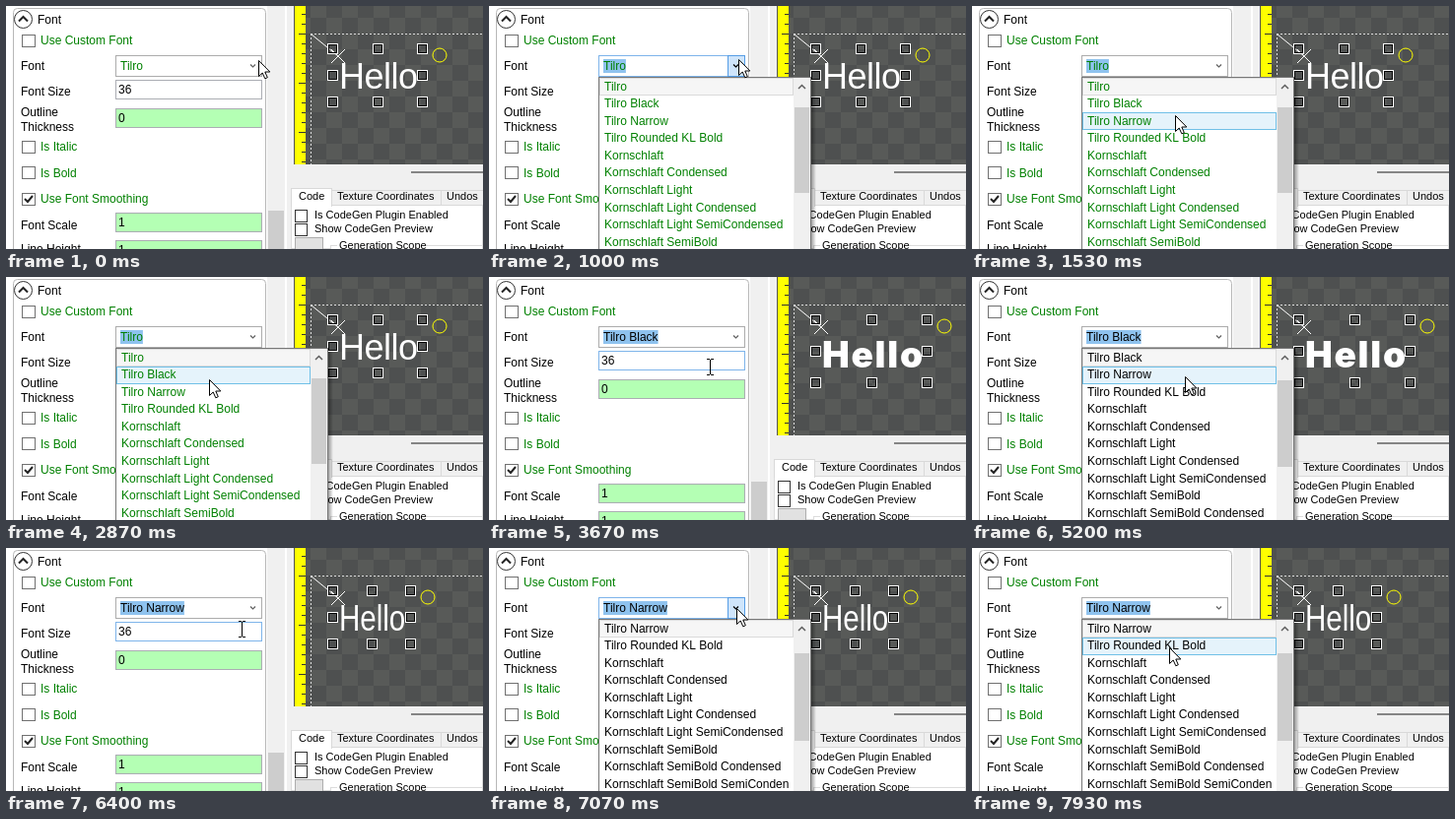
Write an HTML page with a canvas that moves like this. It is 484 px wide and 247 px high and loops after 8 s.

```html
<!DOCTYPE html>
<html lang="en">
<head>
<meta charset="utf-8">
<title>Font picker</title>
<style>
html, body { margin: 0; width: 100%; height: 100%; overflow: hidden; background: #f0f0f0; }
canvas { display: block; }
</style>
</head>
<body>
<canvas id="stage" width="484" height="247"></canvas>
<script>
const g = document.getElementById('stage').getContext('2d');
const SANS = '"Liberation Sans", sans-serif';
const GREEN = '#008000', BLUE = '#7eb4ea', GREY = '#acacac';
const LOOP = 8000, TICKS_PER_MS = 0.015;
const ROW = 17.58, FIELD_X = 111, FIELD_W = 149, LABEL_X = 15;

const family = (name, styles) => styles.map(s => (name + ' ' + s).trim());
const fonts = [
  ...family('Tilro', ['', 'Black', 'Narrow', 'Rounded KL Bold']),
  ...family('Kornschlaft', ['', 'Condensed', 'Light', 'Light Condensed', 'Light SemiCondensed',
    'SemiBold', 'SemiBold Condensed', 'SemiBold SemiConden'])
];
const laterFonts = ['Gavemor Old Style', 'Toolcrate Symbol 7', 'Dorvley Hand IZD', 'Lorvantic Bold',
  'Cobblane', 'Plume Script MF', 'Caladea', 'Solviri', 'Solviri Light', 'Vestolinian TP', 'Corvano MF'];

// Pointer keys: tick, x, y
const pointerKeys = [[0, 257, 55], [2, 254, 54], [18, 254, 54], [23, 207, 111], [24, 206, 112],
  [26, 206, 112], [32, 207, 104], [49, 207, 104], [51, 218, 100], [53, 218, 100], [63, 253, 59],
  [71, 253, 59], [78, 217, 101], [90, 217, 101], [96, 240, 83], [99, 251, 64], [101, 252, 61],
  [114, 252, 61], [119, 201, 101], [120, 201, 101]];
// Drop-down sessions: open tick, close tick
const sessions = [[14, 45], [67, 89], [105, 121]];
const busySpans = [[39, 43], [83, 87]];
// Sample text per chosen font; right and bottom are handle centres
const samples = [
  { font: '36px ' + SANS, right: 422, bottom: 97, baseline: 84, squeeze: 1, spacing: '-0.5px' },
  { font: '900 37px Inter, sans-serif', right: 444, bottom: 107, baseline: 92, squeeze: 1, spacing: '1.7px' },
  { font: '36px ' + SANS, right: 410, bottom: 97, baseline: 84, squeeze: 0.82, spacing: '0px' }
];

const within = (tick, [from, to]) => tick >= from && tick < to;

function rect(x, y, w, h, fill, border) {
  if (border) {
    g.fillStyle = border;
    g.fillRect(x, y, w, h);
    x++; y++; w -= 2; h -= 2;
  }
  g.fillStyle = fill;
  g.fillRect(x, y, w, h);
}

function frameBox(x, y, size, color) {
  g.strokeStyle = color;
  g.lineWidth = 1;
  g.strokeRect(x - size / 2 + 0.5, y - size / 2 + 0.5, size, size);
}

function text(s, x, baseline, color = '#000', size = 12) {
  g.font = size + 'px ' + SANS;
  g.fillStyle = color;
  g.fillText(s, x, baseline);
}

function line(points, color, width = 1, dash = []) {
  g.beginPath();
  points.forEach(([x, y]) => g.lineTo(x, y));
  g.setLineDash(dash);
  g.strokeStyle = color;
  g.lineWidth = width;
  g.stroke();
  g.setLineDash([]);
}

function circle(x, y, r, color, width = 1) {
  g.beginPath();
  g.arc(x, y, r, 0, Math.PI * 2);
  g.strokeStyle = color;
  g.lineWidth = width;
  g.stroke();
}

const chevron = (x, y, w, h, color, width) =>
  line([[x - w, y], [x, y + h], [x + w, y]], color, width);

function checkbox(y, label, baseline, checked) {
  rect(16, y, 14, 13, '#fff', '#707070');
  if (checked) line([[19, y + 6], [22, y + 9], [27, y + 3]], '#212121', 2);
  text(label, 35, baseline, GREEN);
}

function field(y, value, fill, border = '#abadb3') {
  rect(FIELD_X, y, FIELD_W, 20, fill, border);
  text(value, 114, y + 14);
}

function drawForm(tick, sel, pointer, open) {
  rect(0, 0, 285, 247, '#fff');
  g.beginPath();
  g.roundRect(7.5, 2.5, 256, 260, 4);
  g.strokeStyle = '#b8b8b8';
  g.lineWidth = 1;
  g.stroke();
  rect(265, 0, 18, 247, '#f0f0f0');
  rect(266, 208, 16, 39, '#cdcdcd');

  circle(17.5, 13.5, 9, '#333');
  chevron(17.5, 15.5, 4.5, -4.5, '#222', 2);
  text('Font', 32, 18);
  checkbox(29, 'Use Custom Font', 39);
  text('Font', LABEL_X, 65);
  text('Font Size', LABEL_X, 91);
  text('Outline', LABEL_X, 112);
  text('Thickness', LABEL_X, 127);
  checkbox(137, 'Is Italic', 147);
  checkbox(163, 'Is Bold', 174);
  checkbox(190, 'Use Font Smoothing', 200, true);
  text('Font Scale', LABEL_X, 227);
  text('Line Height', LABEL_X, 251);

  const overSize = !open && pointer.y > 75 && pointer.y < 95;
  field(75, '36', '#fff', overSize ? BLUE : undefined);
  field(104, '0', '#b4ffb4');
  field(210, '1', '#b4ffb4');
  field(238, '1', '#b4ffb4');

  const overCombo = tick > 0 && pointer.y < 73;
  rect(FIELD_X, 50, FIELD_W, 22, '#fff', overCombo ? BLUE : GREY);
  if (overCombo) rect(242, 50, 18, 22, open ? '#cfe5fb' : '#dcecfc', open ? '#569de5' : BLUE);
  if (tick >= sessions[0][0]) {
    g.font = '12px ' + SANS;
    rect(116, 54, g.measureText(fonts[sel]).width, 14, '#8fc3ef');
  }
  text(fonts[sel], 116, 65, sel ? '#000' : GREEN);
  chevron(250.5, 59.5, 2.5, 2.5, overCombo ? '#000' : '#606060', 1.2);
}

function drawHandles(xs, ys) {
  xs.forEach((x, i) => ys.forEach((y, j) => {
    if (i !== 1 || j !== 1) {
      frameBox(x, y, 10, '#fff');
      frameBox(x, y, 8, '#000');
    }
  }));
}

function drawEditor(sel) {
  rect(285, 0, 199, 247, '#f0f0f0');
  g.save();
  g.beginPath();
  g.rect(304, 0, 180, 161);
  g.clip();
  for (let x = 0; x < 12; x++)
    for (let y = 0; y < 11; y++)
      rect(293 + x * 16, y * 16 - 4, 16, 16, (x + y) % 2 ? '#585a58' : '#4e5050');
  g.restore();
  rect(292, 0, 1, 161, '#555');
  rect(293, 0, 11, 161, '#ffff00');
  for (let y = 8; y < 160; y += 10) {
    const length = (y - 28) % 50 ? 4 : 7;
    rect(304 - length, y, length, 1, '#333');
  }

  line([[309, 28.5], [484, 28.5]], '#ddd', 1, [2, 2]);
  line([[309.5, 28], [309.5, 161]], '#ddd', 1, [2, 2]);
  line([[309.5, 28.5], [337, 51]], '#fff');
  line([[330, 44], [344, 58]], '#fff');
  line([[344, 44], [330, 58]], '#fff');

  const s = samples[sel];
  g.save();
  g.translate(338, s.baseline);
  g.scale(s.squeeze, 1);
  g.font = s.font;
  g.letterSpacing = s.spacing;
  g.fillStyle = '#fff';
  g.fillText('Hello', 0, 0);
  g.restore();

  drawHandles([331, Math.round((331 + s.right) / 2), s.right],
    [43, Math.round((43 + s.bottom) / 2), s.bottom]);
  circle(s.right + 18, 50, 7, '#ffff00');

  rect(411, 168, 73, 2, '#858585');
}

function drawTabs() {
  rect(289, 202, 195, 45, '#fff', '#dcdcdc');
  rect(330, 187, 112, 16, '#f0f0f0', '#d9d9d9');
  rect(441, 187, 50, 16, '#f0f0f0', '#d9d9d9');
  rect(289, 185, 42, 19, '#fff', '#d9d9d9');
  rect(290, 201, 40, 4, '#fff');
  text('Code', 297, 197, '#000', 11);
  text('Texture Coordinates', 336, 197, '#000', 11);
  text('Undos', 447, 197, '#000', 11);
  rect(293, 207, 13, 13, '#fff', '#333');
  text('Is CodeGen Plugin Enabled', 313, 216, '#000', 11);
  rect(293, 221, 13, 13, '#fff', '#333');
  text('Show CodeGen Preview', 313, 230, '#000', 11);
  rect(293, 235, 29, 20, '#e1e1e1', '#adadad');
  rect(329, 243, 155, 10, '#fff', '#dcdcdc');
  rect(336, 240, 90, 7, '#fff');
  text('Generation Scope', 338, 247, '#000', 11);
}

function drawPopup(sel, pointer, settling) {
  const shadow = g.createLinearGradient(326, 0, 332, 0);
  shadow.addColorStop(0, 'rgba(0,0,0,.45)');
  shadow.addColorStop(1, 'rgba(0,0,0,0)');
  rect(326, 76, 6, 171, shadow);
  rect(111, 72, 216, 180, '#fff', '#777');

  g.save();
  g.beginPath();
  g.rect(112, 73, 197, 174);
  g.clip();
  const color = sel ? '#000' : GREEN;
  const rows = settling ? laterFonts : fonts.slice(sel);
  const top = settling ? 64.6 : 73;
  if (!settling) {
    rect(112, 73, 197, 18, '#f6f6f6', '#dadada');
    const hovered = Math.floor((pointer.y - 73) / ROW);
    if (hovered >= 0) rect(112, Math.round(73 + hovered * ROW), 197, 18, '#e5f3fb', '#70c0e7');
  }
  rows.forEach((name, i) => text(name, 117, Math.round(top + i * ROW + 12.6), color));
  g.restore();

  rect(309, 73, 17, 174, '#f0f0f0');
  if (settling) return;
  chevron(317.5, 84, 3.5, -3.5, '#606060', 1.5);
  rect(310, 103 + sel * 2, 15, 87 + sel, '#cdcdcd');
}

function pointerAt(tick) {
  const i = pointerKeys.findIndex(k => k[0] > tick);
  const [t0, x0, y0] = pointerKeys[i - 1], [t1, x1, y1] = pointerKeys[i];
  const p = (tick - t0) / (t1 - t0);
  return { x: Math.round(x0 + (x1 - x0) * p), y: Math.round(y0 + (y1 - y0) * p) };
}

function drawPointer({ x, y }, beam, busy) {
  if (beam) {
    rect(x - 1, y - 8, 1, 15, '#000');
    for (const edge of [-9, 7]) {
      rect(x - 4, y + edge, 3, 1, '#000');
      rect(x, y + edge, 3, 1, '#000');
    }
    return;
  }
  g.save();
  g.translate(x - 0.5, y + 0.5);
  const outline = new Path2D('M0 0V16L3.7 12.5L6.3 18.3L8.8 17.2L6.3 11.5H11.3Z');
  g.fillStyle = '#fff';
  g.fill(outline);
  g.strokeStyle = '#000';
  g.lineWidth = 1;
  g.stroke(outline);
  if (busy) circle(14, 0, 6.5, '#2f94d8', 3);
  g.restore();
}

function draw(ms) {
  const tick = Math.floor(((ms + 5) % LOOP) * TICKS_PER_MS);
  const sel = sessions.filter(s => tick >= s[1]).length;
  const session = sessions.find(s => within(tick, s));
  const pointer = pointerAt(tick);
  const beam = !session && pointer.y > 75 && pointer.y < 96;

  drawEditor(sel);
  drawTabs();
  drawForm(tick, sel, pointer, session);
  if (session) drawPopup(sel, pointer, tick === session[0]);
  drawPointer(pointer, beam, busySpans.some(span => within(tick, span)));
}

const start = performance.now();
function frame() {
  draw(performance.now() - start);
  requestAnimationFrame(frame);
}
frame();
</script>
</body>
</html>
```
